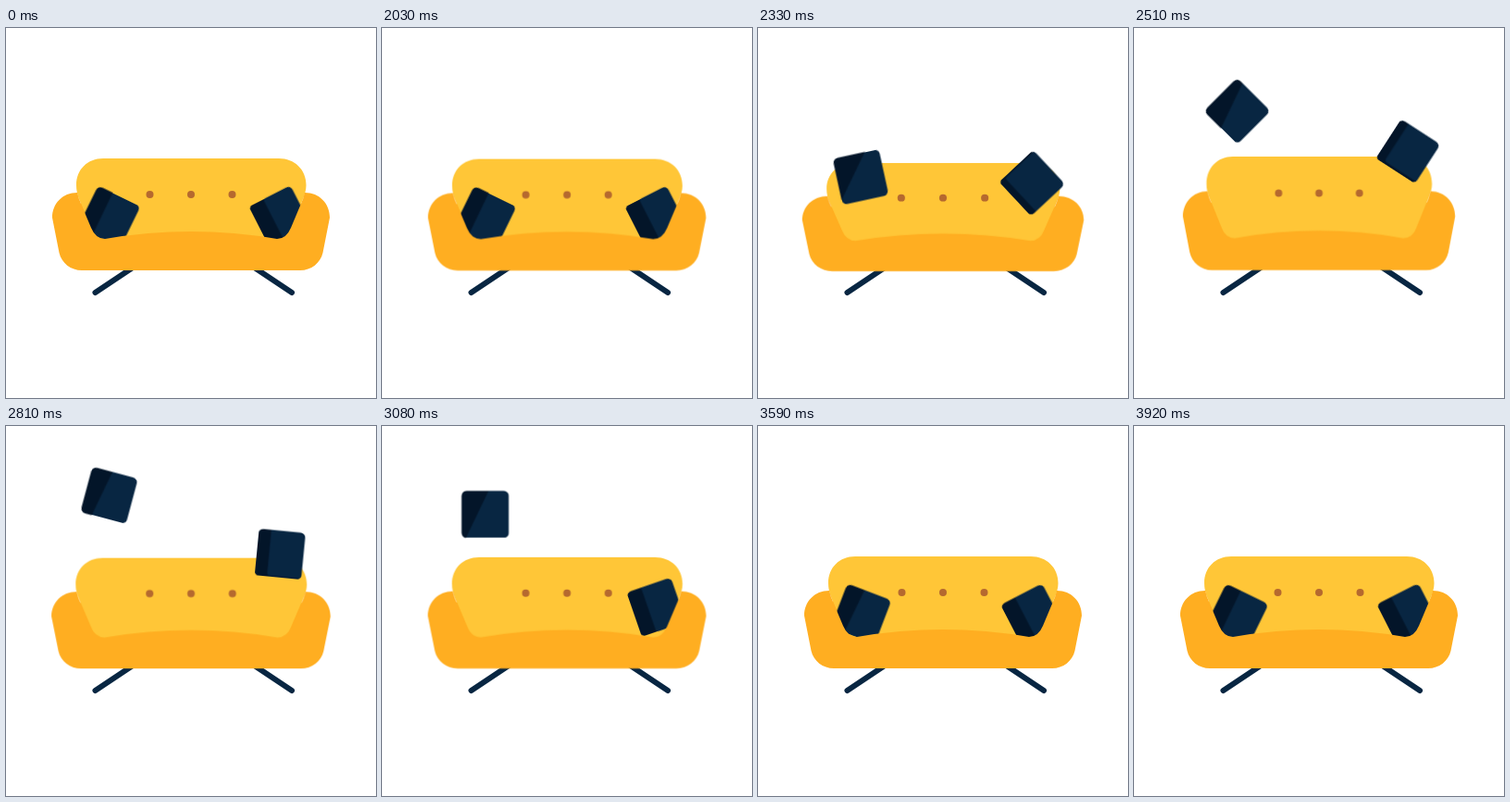
Animation, 400 px wide and 400 px high, one loop 3980 ms. Source, as an HTML page:

```html
<!DOCTYPE html>
<html lang="en">
<head>
<meta charset="utf-8">
<title>Bouncing sofa</title>
<style>
html, body { margin: 0; width: 100%; height: 100%; overflow: hidden; background: #fff; }
svg { display: block; width: 100%; height: 100%; }
.sofa, .move, .spin, .unspin, .face { animation: 3980ms linear infinite; }
.sofa { transform-origin: 200px 289px; animation-name: squash; }
.left .move { animation-name: left-hop; }
.left .spin { animation-name: left-spin; }
.left .unspin { animation-name: left-unspin; }
.right .move { animation-name: right-hop; }
.right .spin { animation-name: right-spin; }
.right .face { animation-name: right-face; }
.legs { fill: none; stroke: #082642; stroke-width: 6; stroke-linecap: round; }
.seat { fill: #ffae21; }
.back { fill: #ffc637; }
.buttons { fill: #b5692f; }
.light { fill: #082642; }
.dark { fill: #031529; }

@keyframes squash {
  0%, 50.1% { transform: scale(1, 1); animation-timing-function: ease-in-out; }
  55.28% { transform: scale(1.027, .938); animation-timing-function: cubic-bezier(.4, 0, .67, .6); }
  58.54% { transform: scale(1.015, .966); animation-timing-function: cubic-bezier(.33, .45, .67, 1); }
  63.07% { transform: scale(.981, 1.0135); animation-timing-function: ease-in-out; }
  69.85% { transform: scale(1.006, .988); animation-timing-function: ease-in-out; }
  74.12% { transform: scale(1, 1); animation-timing-function: ease-in-out; }
  77.39% { transform: scale(1.003, .994); animation-timing-function: ease-in-out; }
  81%, 100% { transform: scale(1, 1); }
}

@keyframes left-hop {
  0%, 50.25% { transform: translate(111.4px, 204.4px); animation-timing-function: ease-in-out; }
  55.03% { transform: translate(111.3px, 210px); animation-timing-function: cubic-bezier(.33, 0, .67, .58); }
  58.54% { transform: translate(111px, 161.5px); animation-timing-function: cubic-bezier(.33, .38, .67, .83); }
  63.07% { transform: translate(111.5px, 90px); animation-timing-function: cubic-bezier(.33, .7, .67, 1); }
  67.59% { transform: translate(111.5px, 74px); animation-timing-function: cubic-bezier(.33, 0, .67, .1); }
  77.39% { transform: translate(111.5px, 95.5px); animation-timing-function: cubic-bezier(.33, .12, .67, .47); }
  84.17% { transform: translate(111.3px, 197.5px); animation-timing-function: ease-in-out; }
  92.7%, 100% { transform: translate(111.4px, 204.4px); }
}
@keyframes left-spin {
  0%, 55.03% { transform: rotate(26deg); animation-timing-function: cubic-bezier(.33, .1, .67, .7); }
  58.54% { transform: rotate(-12deg); animation-timing-function: cubic-bezier(.33, .44, .67, .78); }
  63.07% { transform: rotate(-45deg); animation-timing-function: cubic-bezier(.33, .5, .67, .87); }
  77.39% { transform: rotate(-90deg); animation-timing-function: cubic-bezier(.33, .9, .67, 1); }
  84.17% { transform: rotate(-93deg); animation-timing-function: ease-in-out; }
  92.7%, 100% { transform: rotate(-64deg); }
}
/* Mirrors left-spin so the shading keeps its direction. */
@keyframes left-unspin {
  0%, 55.03% { transform: rotate(-26deg); animation-timing-function: cubic-bezier(.33, .1, .67, .7); }
  58.54% { transform: rotate(12deg); animation-timing-function: cubic-bezier(.33, .44, .67, .78); }
  63.07% { transform: rotate(45deg); animation-timing-function: cubic-bezier(.33, .5, .67, .87); }
  77.39% { transform: rotate(90deg); animation-timing-function: cubic-bezier(.33, .9, .67, 1); }
  84.17% { transform: rotate(93deg); animation-timing-function: ease-in-out; }
  92.7%, 100% { transform: rotate(64deg); }
}

@keyframes right-hop {
  0%, 50.25% { transform: translate(296.2px, 204.2px); animation-timing-function: ease-in-out; }
  55.03% { transform: translate(296.2px, 209.5px); animation-timing-function: cubic-bezier(.33, 0, .67, .69); }
  58.54% { transform: translate(296px, 168px); animation-timing-function: cubic-bezier(.33, .49, .67, .81); }
  63.07% { transform: translate(296px, 133.5px); animation-timing-function: cubic-bezier(.33, .49, .67, 1); }
  65.58% { transform: translate(296px, 126px); animation-timing-function: cubic-bezier(.33, 0, .67, .33); }
  77.39% { transform: translate(296.4px, 195.8px); animation-timing-function: cubic-bezier(.33, .95, .67, 1); }
  80.15% { transform: translate(296.2px, 206.3px); }
  84.17% { transform: translate(296.2px, 206px); animation-timing-function: ease-in-out; }
  92.96%, 100% { transform: translate(296.2px, 204.2px); }
}
@keyframes right-spin {
  0%, 55.03% { transform: rotate(-27deg); animation-timing-function: cubic-bezier(.33, .1, .67, .7); }
  58.54% { transform: rotate(-43deg); }
  63.07% { transform: rotate(-57deg); }
  77.39% { transform: rotate(-109deg); animation-timing-function: ease-out; }
  84.17% { transform: rotate(-119deg); animation-timing-function: ease-in-out; }
  92.96%, 100% { transform: rotate(-117deg); }
}
/* The shaded side passes from one edge of the cushion to the next. */
@keyframes right-face {
  0%, 55.03% { transform: translate(18px, 0); }
  58.54% { transform: translate(8px, 2px); }
  63.07% { transform: translate(3px, 10px); }
  77.39% { transform: translate(0, 17px); }
  84.17%, 100% { transform: translate(0, 18px); }
}
</style>
</head>
<body>
<svg viewBox="0 0 400 400">
  <defs>
    <clipPath id="cushion"><rect x="-25.5" y="-25.5" width="51" height="51" rx="5.5"/></clipPath>
  </defs>

  <path class="legs" d="M96.5 286L140 257M309 286L265.5 257"/>

  <g class="sofa">
    <rect class="seat" x="66" y="190" width="268" height="60"/>
    <path class="back" d="M76 170C76 153 88 141 105 141H295C312 141 324.500 153 324.500 170C324.500 175 323 180 321 185L308 216Q303 232 293 232H107Q97 232 92 216L79 185C77 180 76 175 76 170Z"/>
    <g class="buttons">
      <circle cx="155.5" cy="180" r="4"/>
      <circle cx="200" cy="180" r="4"/>
      <circle cx="244.500" cy="180" r="4"/>
    </g>
  </g>

  <g class="left"><g class="move"><g class="spin" clip-path="url(#cushion)">
    <rect class="light" x="-26" y="-26" width="52" height="52"/>
    <g class="unspin"><path class="dark" d="M10.700 -40L-27.700 40H-60V-40Z"/></g>
  </g></g></g>

  <g class="right"><g class="move"><g class="spin" clip-path="url(#cushion)">
    <rect class="dark" x="-26" y="-26" width="52" height="52"/>
    <rect class="light face" x="-25.5" y="-25.5" width="60" height="60" rx="3"/>
  </g></g></g>

  <g class="sofa">
    <path class="seat" d="M77 178L79 185L92 216Q97 228 107 228Q200 212 293 228Q303 228 308 216L321 185L323 178C339 178 350 190 350 205L342.500 243C340 254 330 262 318 262H82C70 262 60 254 57.500 243L50 205C50 190 61 178 77 178Z"/>
  </g>
</svg>
</body>
</html>
```
